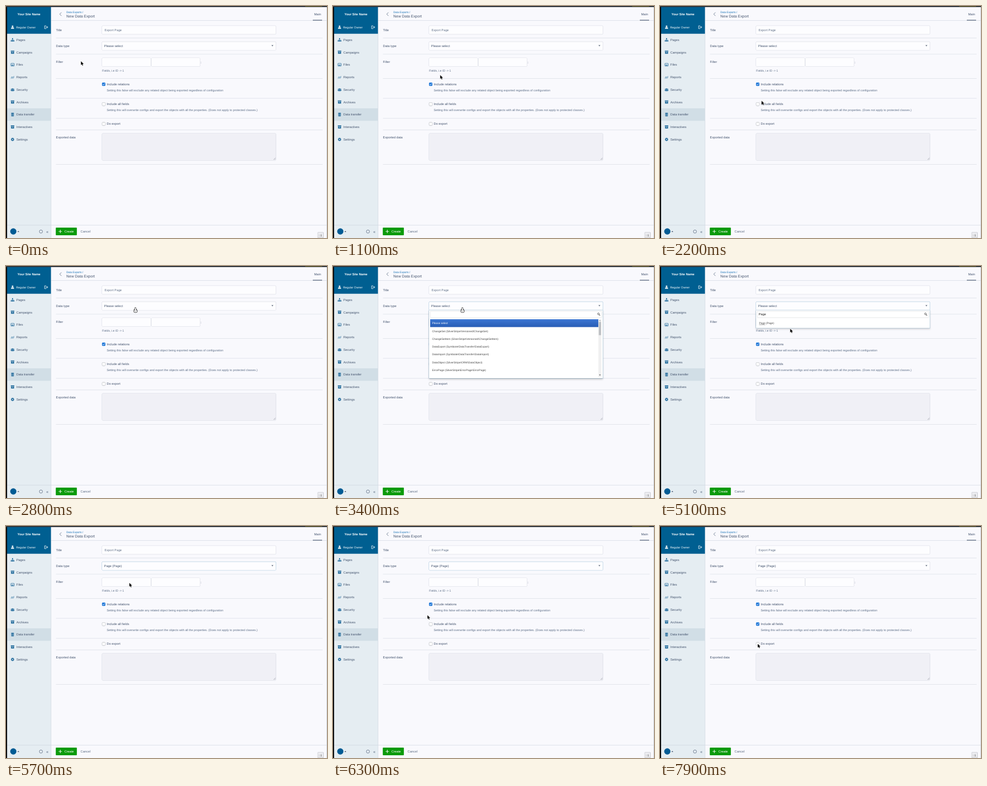
These frames come from a looping animation (588 by 424 pixels, 8000 ms). An HTML page with a canvas:

```html
<!DOCTYPE html>
<html lang="en">
<head>
<meta charset="utf-8">
<title>New Data Export</title>
<style>
html, body { margin: 0; width: 100%; height: 100%; overflow: hidden; background: #f9f9fd; }
canvas { display: block; width: 588px; height: 424px; }
</style>
</head>
<body>
<canvas id="stage" width="588" height="424"></canvas>
<script>
const ctx = document.getElementById('stage').getContext('2d');
const LOOP = 8000, TICK = 100;
const SCALE = 0.4423; // page pixels to stage pixels
const INK = '#43536d', HINT = '#596b84', BLUE = '#005f91', ICON = '#20699a';
const PAGE = '#f9f9fd', SIDE = '#e5edf2', LINE = '#dde0e8', EDGE = '#c9cdd8', FOCUS = '#84b2cf';
const LEFT = 176, WIDTH = 318.4, RIGHT = LEFT + WIDTH;

// ---------- helpers ----------
function text(str, x, y, size = 13, color = INK, weight = '') {
  ctx.save();
  ctx.translate(x, y);
  ctx.scale(SCALE, SCALE);
  ctx.font = `${weight} ${size}px "Liberation Sans", Arial, sans-serif`;
  ctx.textRendering = 'geometricPrecision';
  ctx.fillStyle = color;
  ctx.fillText(str, 0, 0);
  const w = ctx.measureText(str).width * SCALE;
  ctx.restore();
  return w;
}

function rect(x, y, w, h, color) {
  ctx.fillStyle = color;
  ctx.fillRect(x, y, w, h);
}

function paint(fill, stroke, lw) {
  if (stroke) { ctx.strokeStyle = stroke; ctx.lineWidth = lw; ctx.stroke(); }
  if (fill) { ctx.fillStyle = fill; ctx.fill(); }
}

function box(x, y, w, h, r, fill, stroke, lw = 0.8) {
  ctx.beginPath();
  ctx.roundRect(x, y, w, h, r);
  paint(fill, stroke, lw);
}

function dot(x, y, r, fill, stroke, lw = 0.8) {
  ctx.beginPath();
  ctx.arc(x, y, r, 0, 7);
  paint(fill, stroke, lw);
}

function path(points, fill, stroke, lw = 0.8) {
  ctx.beginPath();
  for (const [x, y] of points) ctx.lineTo(x, y);
  if (fill) ctx.closePath();
  paint(fill, stroke, lw);
}

const line = (points, color, lw) => path(points, null, color, lw);

function triangle(x, y, r, dir, color) {
  path([[x - r, y - r / 2 * dir], [x + r, y - r / 2 * dir], [x, y + r * 0.7 * dir]], color);
}

// Sideways arrow head: dir -1 points left, 1 points right.
function chevron(x, y, r, dir, color, lw) {
  line([[x - r * dir, y - r], [x, y], [x - r * dir, y + r]], color, lw);
}

function person(x, y, s, color) {
  dot(x, y - 1.5 * s, 1.4 * s, color);
  ctx.beginPath();
  ctx.ellipse(x, y + 2.6 * s, 2.7 * s, 2.5 * s, 0, Math.PI, 0);
  paint(color);
}

// ---------- menu icons, centred on the origin ----------
const icons = {
  tree() {
    rect(-1, -3, 2, 2, ICON);
    rect(-0.3, -1, 0.6, 2, ICON);
    rect(-2.6, 0, 5.2, 0.6, ICON);
    for (let i = -1; i <= 1; i++) rect(2.3 * i - 1, 1, 2, 2, ICON);
  },
  crate() {
    rect(-3.2, -2.9, 6.4, 1.7, ICON);
    rect(-2.8, -0.7, 5.6, 3.4, ICON);
    rect(-1, 0, 2, 0.7, SIDE);
  },
  image() {
    box(-3, -2.4, 6, 4.8, 0.5, null, ICON);
    triangle(-0.8, 0.6, 1.5, -1, ICON);
    triangle(1, 0.6, 1.4, -1, ICON);
  },
  chart() {
    for (const y of [0, 1.8]) line([[-3, y + 1], [-1, y - 1], [0.6, y + 0.4], [3, y - 2]], ICON, 0.7);
  },
  people() {
    for (const side of [-1, 1]) person(2.1 * side, 0, 0.65, ICON);
    person(0, 0.3, 0.95, ICON);
  },
  stack() {
    for (let i = -1; i <= 1; i++) box(-2.6, 2.2 * i - 0.85, 5.2, 1.7, 0.8, ICON);
  },
  gear() {
    for (let a = 0; a < 2 * Math.PI; a += Math.PI / 4) line([[0, 0], [3.1 * Math.cos(a), 3.1 * Math.sin(a)]], ICON, 1.2);
    dot(0, 0, 2.3, ICON);
    dot(0, 0, 1, SIDE);
  }
};

const menu = {
  Pages: 'tree', Campaigns: 'crate', Files: 'image', Reports: 'chart', Security: 'people',
  Archives: 'crate', 'Data transfer': 'stack', Interactives: 'crate', Settings: 'gear'
};

const options = [
  'Please select',
  'ChangeSet (SilverStripe\\Versioned\\ChangeSet)',
  'ChangeSetItem (SilverStripe\\Versioned\\ChangeSetItem)',
  'DataExport (Symbiote\\DataTransfer\\DataExport)',
  'DataImport (Symbiote\\DataTransfer\\DataImport)',
  'DataObject (SilverStripe\\ORM\\DataObject)',
  'ErrorPage (SilverStripe\\ErrorPage\\ErrorPage)'
];

// ---------- page parts ----------
function sidebar() {
  rect(2, 2, 80, 422, SIDE);
  rect(82, 2, 0.8, 422, '#d3dbe4');
  rect(2, 2, 80.3, 48.7, BLUE);
  text('Your Site Name', 21, 17.2, 13, '#fff', 'bold');
  person(12, 38.7, 1.05, '#fff');
  text('Regular Owner', 18.5, 40.8, 12, '#fff');
  line([[73.6, 36.2], [70.8, 36.2], [70.8, 41.4], [73.6, 41.4]], '#fff');
  line([[72.4, 38.8], [76.3, 38.8]], '#fff');
  chevron(76.4, 38.8, 1.9, 1, '#fff', 0.9);

  Object.entries(menu).forEach(([label, icon], i) => {
    const y = 61.8 + 22.76 * i;
    if (label === 'Data transfer') rect(2, y - 11.3, 80, 22.6, '#d1dee6');
    ctx.save();
    ctx.translate(12, y);
    icons[icon]();
    ctx.restore();
    text(label, 19, y + 2.1);
  });

  rect(2, 400, 80, 0.8, '#d0d9e2');
  dot(13.4, 412, 5.7, '#005b94');
  triangle(22.6, 412.2, 1.7, -1, INK);
  dot(64, 412.2, 2.9, null, '#5d6c82');
  text('«', 73.8, 415.2, 16);
}

function label(str, y) {
  text(str, 91.6, y + 2);
}

function input(x, y, w, edge = EDGE) {
  box(x, y - 7.7, w, 15.4, 1.5, '#fdfdff', edge);
}

function checkbox(y, str, on, hint) {
  box(176.3, y - 2.7, 5.4, 5.4, 0.9, on ? '#1873d6' : '#fff', on ? '#1873d6' : '#6f747c', 0.7);
  if (on) line([[177.4, y], [178.6, y + 1.3], [180.7, y - 1.4]], '#fff', 0.9);
  text(str, 184.6, y + 1.8);
  if (hint) text(hint, 184.4, y + 12.8, 12.12, HINT);
}

function form(s) {
  rect(82, 2, 506, 422, PAGE);
  chevron(98.4, 14.9, 3.2, -1, '#65758d', 0.9);
  text('Data Exports /', 110.6, 13.1, 11, '#1270b4');
  text('New Data Export', 110.6, 21, 15.6);
  text('Main', 564.4, 16.8);
  for (const y of [26, 400]) rect(82, y, 506, 0.8, '#d8dce6');
  rect(562, 25.4, 17, 1.1, INK);
  for (const y of [58, 87.6, 132, 168.4, 204.8, 226, 289.2]) rect(91.5, y, 488.5, 0.8, LINE);

  label('Title', 43.6);
  input(LEFT, 43.9, WIDTH);
  text('Export Page', 180.4, 46, 13, '#66758b');

  label('Data type', 72.6);
  input(LEFT, 73.1, WIDTH, s.focus ? FOCUS : EDGE);
  text(s.chosen ? 'Page (Page)' : 'Please select', 179.8, 75.1);
  triangle(488, 72.4, 1.8, 1, '#5d6878');

  label('Filter', 102.4);
  for (const x of [LEFT, 266.4]) input(x, 102.8, 89);
  text(':', 356.3, 105.2);
  text('Fields, i.e ID -> 1', LEFT, 119.6, 12, HINT);

  checkbox(143, 'Include relations', true,
    'Setting this false will exclude any related object being exported regardless of configuration');
  checkbox(179.3, 'Include all fields', s.allFields,
    'Setting this will overwrite configs and export the objects with all the properties. (Does not apply to protected classes.)');
  checkbox(215.5, 'Do export', false);

  label('Exported data', 240.1);
  box(LEFT, 233, WIDTH, 49, 1.5, '#f0f0f6', EDGE);
  for (const d of [1.6, 3.6]) line([[RIGHT - 0.8 - d, 281], [RIGHT - 0.8, 281 - d]], '#8d939d', 0.6);

  box(91.2, 405, 38.6, 14, 1, '#0b9a0b');
  rect(96.4, 411.6, 6, 0.9, '#fff');
  rect(98.95, 409, 0.9, 6, '#fff');
  text('Create', 107, 414.1, 13, '#fff');
  text('Cancel', 136.6, 413.9, 13.2, '#5a6a82');
  rect(587.2, 2, 0.8, 422, '#c4c9d3');
}

function highlight(right) {
  const g = ctx.createLinearGradient(0, 97.3, 0, 111.6);
  g.addColorStop(0, '#3b76d3');
  g.addColorStop(1, '#285db5');
  rect(178, 97.3, right - 178, 14.3, g);
}

function dropdown(s) {
  const bottom = s.typed ? 113.6 : 205;
  ctx.save();
  ctx.shadowColor = 'rgba(0,0,0,.18)';
  ctx.shadowBlur = 3;
  ctx.shadowOffsetY = 1.8;
  box(LEFT, 80.6, WIDTH, bottom - 80.6, 0, '#fff', FOCUS);
  ctx.restore();

  box(178.4, 82.8, 313.6, 11.2, 0, '#fff', '#b2b5bb', 0.6);
  dot(486.2, 87.4, 1.6, null, '#555', 0.9);
  line([[487.4, 88.6], [489.2, 90.6]], '#555', 1.1);
  const w = text(s.typed, 180.7, 90.2, 13, '#222');
  if (s.caret) rect(181 + w, 85.3, 0.7, 6.2, '#222');

  if (s.typed) {
    const color = s.hot ? '#fff' : '#444';
    if (s.hot) highlight(492);
    const start = text(s.typed, 181.5, 106.2, 11, color);
    text('Page (Page)'.slice(s.typed.length), 181.5 + start, 106.2, 11, color);
    rect(181.5, 106.9, start, 0.5, color);
    return;
  }

  highlight(486);
  options.forEach((name, i) => text(name, 181.5, 106.2 + 14.3 * i, 11, i ? '#444' : '#fff'));
  rect(486.2, 97.3, 5.4, 105.5, '#f0f0f1');
  rect(486.8, 102.2, 4.2, 24.2, '#bfc1c4');
  triangle(488.9, 99.7, 1.3, -1, '#888');
  triangle(488.9, 199.2, 1.5, 1, '#444');
}

function windowEdges() {
  rect(0, 0, 2, 424, '#050608');
  rect(0, 0, 588, 2, '#30363b');
  rect(548, 0, 31, 1, '#756b2e');
  box(571.3, 414, 10, 9.4, 0, '#ececf0', '#9b9ea6');
  text('::1', 573, 420.8, 12, '#444');
}

// ---------- pointer ----------
// Each stop is reached between the two given times, with a soft start and end.
const stops = [
  { from: 100, to: 700, x: 203, y: 101 },
  { from: 800, to: 1600, x: 182, y: 181 },
  { from: 2080, to: 2800, x: 237, y: 77 },
  { from: 4750, to: 5100, x: 238.5, y: 114.7 },
  { from: 5100, to: 5400, x: 226, y: 104 },
  { from: 5900, to: 6300, x: 173, y: 163 },
  { from: 6300, to: 6800, x: 178.3, y: 177.5 },
  { from: 7300, to: 7900, x: 179, y: 215.4 }
];

function pointerAt(t) {
  let x = 137.3, y = 101;
  for (const stop of stops) {
    const u = Math.min(1, Math.max(0, (t - stop.from) / (stop.to - stop.from)));
    const ease = u * u * (3 - 2 * u);
    x += (stop.x - x) * ease;
    y += (stop.y - y) * ease;
  }
  return { x, y };
}

function pointer({ x, y }, open) {
  const hand = x > LEFT && y > 65 && y < (open ? 112 : 81);
  ctx.save();
  ctx.translate(x, y);
  ctx.lineJoin = 'round';
  if (hand) {
    box(-2.6, 2.7, 5.6, 4.8, 1.6, '#fff', '#111', 1.4);
    box(-0.9, -0.6, 1.8, 6, 0.8, '#fff', '#111', 1.2);
    rect(-0.7, 3, 1.4, 3, '#fff');
  } else {
    path([[0, 0], [0, 6.8], [1.6, 5.4], [2.7, 7.9], [3.9, 7.4], [2.8, 5], [5, 4.9]], '#050505', '#fff', 1);
  }
  ctx.restore();
}

// ---------- timeline ----------
function state(t) {
  const keys = Math.min(4, Math.max(0, Math.floor((t - 4000) / 150) + 1));
  const blinkStart = keys ? Math.max(4000, Math.min(t, 4500)) : 2900;
  return {
    open: t >= 3000 && t < 5600,
    typed: 'Page'.slice(0, keys),
    caret: (t - blinkStart) % 1000 < 500,
    hot: t < 5000 || t >= 5300,
    chosen: t >= 5600,
    focus: t >= 3000 && t < 7400,
    allFields: t >= 7200
  };
}

function render(t) {
  const s = state(t);
  form(s);
  sidebar();
  if (s.open) dropdown(s);
  windowEdges();
  pointer(pointerAt(t), s.open);
}

let start;
function tick(now) {
  start ??= now;
  const t = (now - start) % LOOP;
  render(t - t % TICK); // the screen updates ten times a second
  requestAnimationFrame(tick);
}
requestAnimationFrame(tick);
</script>
</body>
</html>
```
